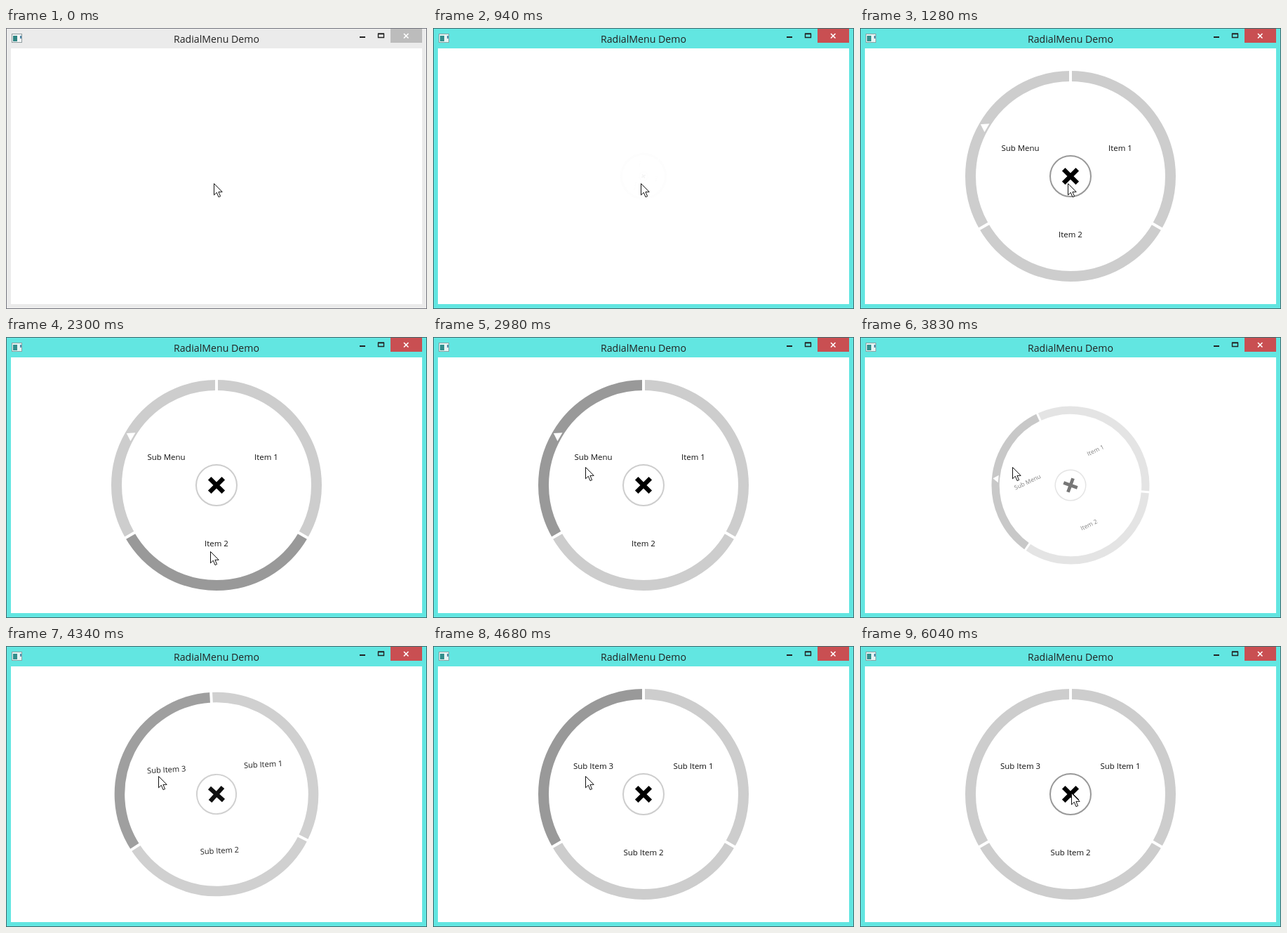
An HTML page for the animation above (6210 ms loop, 600 by 400 pixels).

```html
<!DOCTYPE html>
<html lang="en">
<head>
<meta charset="utf-8">
<title>RadialMenu Demo</title>
<style>
  html, body { margin: 0; width: 100%; height: 100%; overflow: hidden; background: #fff; }
  svg { display: block; width: 100%; height: 100%; }
  text { font-family: "Open Sans", "Noto Sans", sans-serif; text-anchor: middle; }
</style>
</head>
<body>
<svg viewBox="0 0 600 400" xmlns="http://www.w3.org/2000/svg">
  <rect id="frame" x=".5" y=".5" width="599" height="399"/>
  <rect x="7" y="29" width="586" height="364" fill="#fff"/>

  <g id="icon">
    <rect x="8.5" y="8.5" width="14" height="12" fill="#f4f6f6" stroke="#8f9c9f"/>
    <rect x="10" y="11" width="6" height="8" fill="#2f8583"/>
    <rect x="20" y="11" width="2" height="4" fill="#4f86a8"/>
  </g>
  <text x="300" y="21" font-size="14.15" fill="#222">RadialMenu Demo</text>

  <rect x="504" y="12" width="8" height="2" fill="#222"/>
  <path d="M530.5 8.5h8v5h-8zM530 8h9" fill="none" stroke="#222" stroke-width="1.4"/>
  <rect id="close" x="548" y="1" width="45" height="20"/>
  <path d="M567 8l6.5 6.5m0-6.5l-6.5 6.5" stroke="#fff" stroke-width="1.6"/>

  <g id="menu">
    <g id="sectors" fill="none" stroke-width="15"></g>
    <g id="gaps" stroke="#fff" stroke-width="4"></g>
    <path id="arrow" d="M148 0L137.5 -7V7z" transform="rotate(210)" fill="#fff"/>
    <g id="labels" font-size="11.45" fill="#111"></g>
    <circle id="hub" r="29" fill="#fff" stroke-width="2"/>
    <path d="M-9.8 -9.8L9.8 9.8M9.8 -9.8L-9.8 9.8" stroke="#000" stroke-width="6.4"/>
  </g>

  <path id="cursor" d="M.5 .5V16.8L4.3 13.2L7 19.6L9.6 18.5L6.9 12.3H12.2Z"
        fill="#fff" stroke="#111" stroke-width="1"/>
</svg>
<script>
const NS = 'http://www.w3.org/2000/svg';
const LOOP = 6210, HOLD = 600, STEP = 170;
const CX = 300, CY = 211;
const MAIN = ['Item 1', 'Item 2', 'Sub Menu'];
const SUB = ['Sub Item 1', 'Sub Item 2', 'Sub Item 3'];
const SPOTS = [[71, -36], [0, 87], [-71.5, -36]];

// pointer path: time, x, y
const PATH = [
  [1280, 296, 221], [1450, 303, 217], [1790, 368, 187], [1960, 370, 200],
  [2130, 337, 285], [2300, 291, 305], [2470, 284, 300], [2640, 252, 255],
  [2810, 226, 205], [2980, 217, 185], [5020, 217, 185], [5190, 221, 186],
  [5700, 285, 205], [6040, 301, 209]
];

const $ = id => document.getElementById(id);
const clamp = v => Math.min(1, Math.max(0, v));
const easeOut = p => 1 - (1 - p) ** 2;
const span = (t, from, length) => clamp((t - from) / length);

function add(parent, tag, attrs) {
  const el = document.createElementNS(NS, tag);
  for (const k in attrs) el.setAttribute(k, attrs[k]);
  return parent.appendChild(el);
}

function polar(r, deg) {
  const a = deg * Math.PI / 180;
  return (r * Math.cos(a)).toFixed(2) + ' ' + (r * Math.sin(a)).toFixed(2);
}

const sectors = [], labels = [];
SPOTS.forEach(([x, y], i) => {
  const a = -90 + i * 120;
  sectors.push(add($('sectors'), 'path', {
    d: `M${polar(142.5, a)}A142.5 142.5 0 0 1 ${polar(142.5, a + 120)}`
  }));
  add($('gaps'), 'path', { d: `M${polar(133, a)}L${polar(152, a)}` });
  labels.push(add($('labels'), 'text', { x, y }));
});

function pointer(t) {
  if (t <= PATH[0][0]) return PATH[0].slice(1);
  for (let i = 1; i < PATH.length; i++) {
    const [t0, x0, y0] = PATH[i - 1], [t1, x1, y1] = PATH[i];
    if (t <= t1) {
      const p = (t - t0) / (t1 - t0);
      return [x0 + (x1 - x0) * p, y0 + (y1 - y0) * p];
    }
  }
  return PATH[PATH.length - 1].slice(1);
}

// 0 closed, 1 open
function openness(t) {
  if (t < 3660) return easeOut(span(t, 900, 340));
  if (t < 4000) return 1 - span(t, 3660, 340) ** 2;
  return easeOut(span(t, 4060, 340));
}

// -1 for the hub, otherwise the sector index
function hovered(x, y) {
  const dx = x - CX, dy = y - CY;
  if (Math.hypot(dx, dy) < 30) return -1;
  const deg = Math.atan2(dy, dx) * 180 / Math.PI;
  return Math.floor((deg + 450) % 360 / 120);
}

const shade = on => on ? '#999' : '#cdcdcd';

function draw(t) {
  const active = t >= 940, sub = t >= 4000;
  $('frame').setAttribute('fill', active ? '#62e6e1' : '#ebebeb');
  $('frame').setAttribute('stroke', active ? '#42686c' : '#73757d');
  $('close').setAttribute('fill', active ? '#c94f52' : '#bcbcbc');
  $('icon').setAttribute('opacity', active ? 0.9 : 1);

  const s = openness(t), [x, y] = pointer(t), hot = hovered(x, y);
  $('menu').setAttribute('transform',
    `translate(${CX} ${CY}) rotate(${-100 * (1 - s)}) scale(${s})`);
  $('menu').setAttribute('opacity', s ** 2.2);
  $('menu').setAttribute('visibility', s > 0 ? 'visible' : 'hidden');
  $('arrow').setAttribute('opacity', sub ? 0 : 1);
  $('hub').setAttribute('stroke', shade(hot < 0));
  sectors.forEach((el, i) => el.setAttribute('stroke', shade(hot === i)));
  labels.forEach((el, i) => { el.textContent = (sub ? SUB : MAIN)[i]; });
  $('cursor').setAttribute('transform', `translate(${Math.round(x)} ${Math.round(y)})`);
}

function tick() {
  const t = performance.now() % LOOP;
  // the picture advances in fixed steps after the first hold
  draw(t < HOLD ? 0 : HOLD + Math.floor((t - HOLD) / STEP) * STEP);
  requestAnimationFrame(tick);
}
tick();
</script>
</body>
</html>
```
